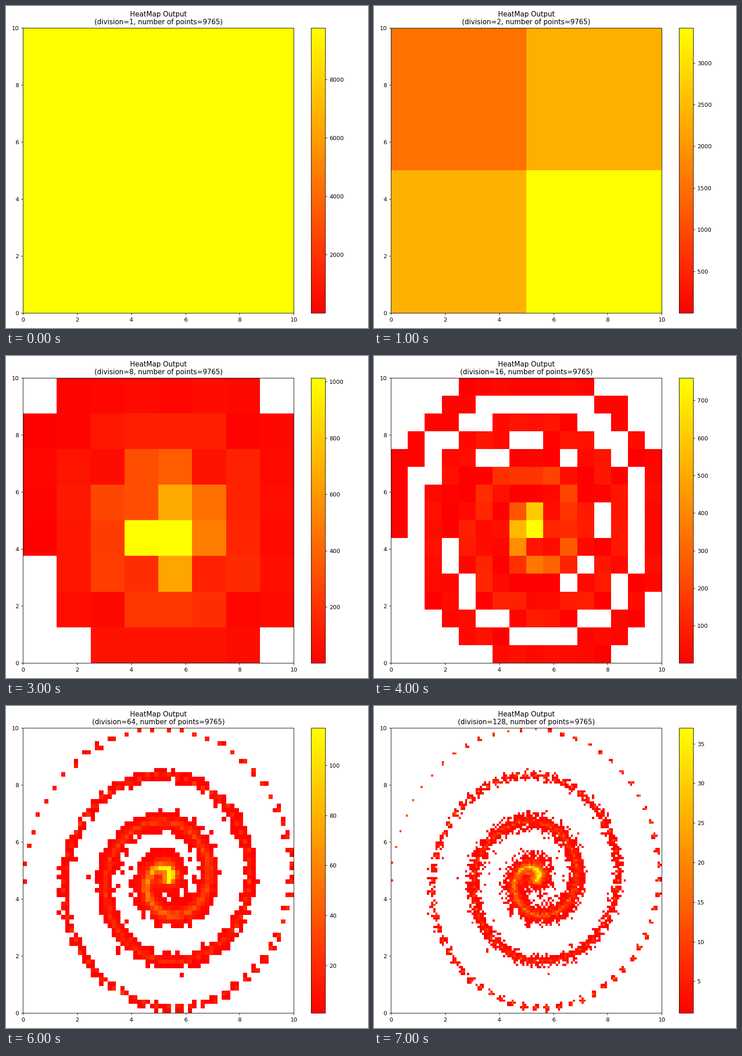
A matplotlib script that plays this animation: 794x706 px, repeating every 8 s.

```python
import numpy as np
import matplotlib.pyplot as plt
from matplotlib.animation import FuncAnimation

W, H, DPI = 794, 706, 90
TOTAL = 9765
# Highest cell count for divisions 1, 2, 4 ... 128
PEAKS = [TOTAL, 3420, 2187, 1014, 760, 370, 115, 37]


def spiral_points(turns=3.5, steps=210):
    """Clusters along an inward spiral, growing in size and scatter."""
    rng = np.random.default_rng(4)
    ends = np.cumsum(np.linspace(9, 83.56, steps + 1))
    step = np.searchsorted(ends, np.arange(TOTAL) * ends[-1] / TOTAL, side="right")
    u = turns * (1 - step / steps)
    reach = 0.08 * (turns - u) * rng.normal(size=TOTAL)
    angle = rng.uniform(0, 2 * np.pi, TOTAL)
    x = 5.34 + 1.52 * u * np.cos(2 * np.pi * u) + reach * np.cos(angle)
    y = 4.66 + 1.63 * u * np.sin(2 * np.pi * u) + reach * np.sin(angle)
    return np.clip(x, 0, 10), np.clip(y, 0, 10)


def px_axes(left, right, top, bottom):
    return fig.add_axes([left / W, 1 - bottom / H,
                         (right - left) / W, (bottom - top) / H])


def heat(div, peak):
    edges = np.linspace(0, 10, div + 1)
    grid, _, _ = np.histogram2d(py, px, bins=[edges, edges])
    return ax.pcolormesh(edges, edges, np.ma.masked_equal(grid, 0),
                         cmap="autumn", vmin=1, vmax=peak)


px, py = spiral_points()
plt.rcParams["font.family"] = "DejaVu Sans"
fig = plt.figure(figsize=((W + 0.01) / DPI, (H + 0.01) / DPI), dpi=DPI,
                 facecolor="white")
ax = px_axes(37.2, 631.2, 47.8, 672.8)
cax = px_axes(669.2, 700.4, 47.8, 672.8)
mesh = heat(1, PEAKS[0])
bar = fig.colorbar(mesh, cax=cax)


def draw(i):
    global mesh
    div = 2 ** i
    mesh.remove()
    mesh = heat(div, PEAKS[i])
    bar.update_normal(mesh)
    ax.set(xlim=(0, 10), ylim=(0, 10))
    ax.set_title(f"HeatMap Output\n(division={div}, number of points={TOTAL})")
    return [mesh]


anim = FuncAnimation(fig, draw, frames=len(PEAKS), interval=1000,
                     repeat=True, repeat_delay=0, blit=False)
plt.show()
```
